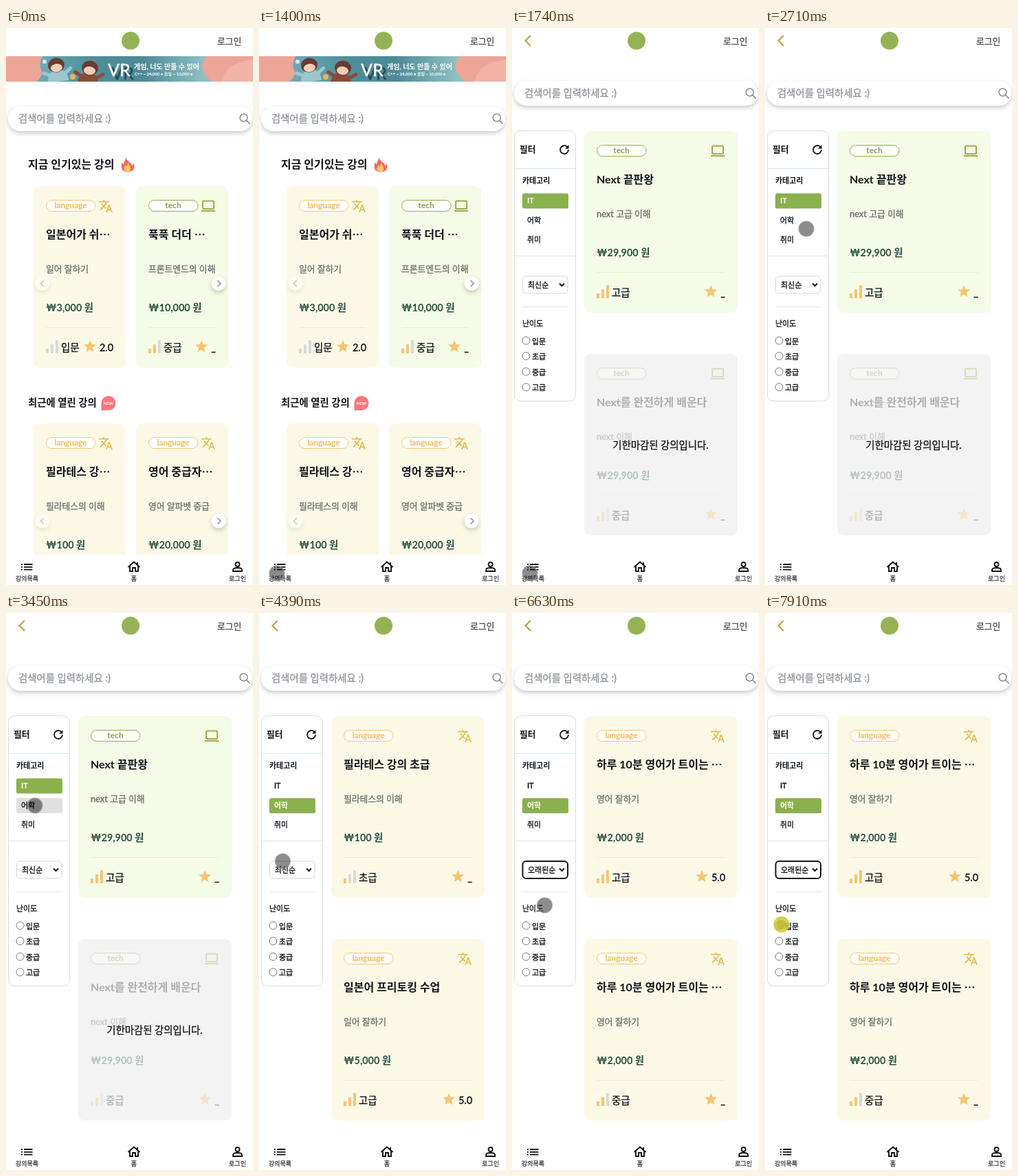
An HTML page that plays this animation: 359 px wide and 810 px high, repeating every 8 s.

```html
<!DOCTYPE html>
<html lang="ko">
<head>
<meta charset="utf-8">
<title>강의 목록</title>
<style>
  html, body { margin: 0; width: 100%; height: 100%; overflow: hidden; background: #fefefe; }
  svg { display: block; width: 100vw; height: 100vh; }
  text { font-family: Lato, "Noto Sans CJK KR", "Noto Sans CJK", sans-serif; font-weight: 500; white-space: pre; stroke-width: .3px; }
  .b { font-weight: 700; stroke: none; }
  .soft { filter: drop-shadow(0 3px 3px rgba(0, 0, 0, .2)); }
  .menu { filter: drop-shadow(0 10px 14px rgba(0, 0, 0, .4)); }
</style>
</head>
<body>
<svg id="stage" viewBox="0 0 359 810"></svg>
<script>
const AMBER = '#f8c471', GOLD = '#e3bd4d', GREEN = '#8bb04e', INK = '#11151c';

// A hairline stroke in the fill colour gives regular text a medium weight.
const text = (x, y, size, str, fill = INK, attrs = '') =>
  `<text x="${x}" y="${y}" font-size="${size}" fill="${fill}" stroke="${fill}" ${attrs}>${str}</text>`;
const rect = (x, y, w, h, r, fill, attrs = '') =>
  `<rect x="${x}" y="${y}" width="${w}" height="${h}" rx="${r}" fill="${fill}" ${attrs}/>`;
const circle = (x, y, r, fill, attrs = '') =>
  `<circle cx="${x}" cy="${y}" r="${r}" fill="${fill}" ${attrs}/>`;
const line = (d, color, width = 1, attrs = '') =>
  `<path d="${d}" fill="none" stroke="${color}" stroke-width="${width}" ${attrs}/>`;
const group = (id, body, attrs = '') => `<g id="${id}" ${attrs}>${body}</g>`;
const BOLD = 'class="b"', MID = 'text-anchor="middle"', END = 'text-anchor="end"';

function star(cx, cy) {
  const points = Array.from({ length: 10 }, (_, i) => {
    const r = i % 2 ? 4.2 : 9.6, a = i * Math.PI / 5;
    return `${(cx + r * Math.sin(a)).toFixed(1)},${(cy - r * Math.cos(a)).toFixed(1)}`;
  });
  return `<polygon points="${points.join(' ')}" fill="${AMBER}"/>`;
}

const translateIcon = (x, y) => `<path transform="translate(${x} ${y}) scale(.91)" fill="${GOLD}" d="M12.87 15.07l-2.54-2.51.03-.03c1.74-1.94 2.98-4.17 3.71-6.53H17V4h-7V2H8v2H1v1.99h11.17C11.5 7.92 10.44 9.75 9 11.35 8.07 10.32 7.3 9.19 6.69 8h-2c.73 1.63 1.73 3.17 2.98 4.56l-5.09 5.02L4 19l5-5 3.11 3.11zM18.5 10h-2L12 22h2l1.12-3h4.75L21 22h2zm-2.62 7l1.62-4.33L19.12 17z"/>`;
const laptopIcon = (x, y) =>
  rect(x + 2, y + 1, 16, 11.5, 1, 'none', 'stroke="#a3a94f" stroke-width="2"') +
  line(`M${x} ${y + 15.5}h20`, '#a3a94f', 2);

const LEVELS = ['입문', '초급', '중급', '고급'];

function card(x, y, w, { tech, title, sub, price, level, rating = '_', closed }) {
  const right = x + w - 18, tint = tech ? GREEN : AMBER;
  const background = closed ? '#f3f3f3' : tech ? '#f4fbe6' : '#fbf9e6';
  const bars = [0, 1, 2].map(i =>
    rect(x + 18 + i * 7, y + 236 - i * 6, 4, 7 + i * 6, .5, i < level ? AMBER : '#d6d9de')).join('');
  const content =
    rect(x + 18.5, y + 20.5, 71.5, 16, 8, '#fff', `stroke="${tint}"`) +
    text(x + 54, y + 32, 12, tech ? 'tech' : 'language', tech ? '#7f9f48' : '#efb95c', MID + (tech ? ' ' + BOLD : '')) +
    (tech ? laptopIcon(right - 21, y + 20.5) : translateIcon(right - 22, y + 18)) +
    text(x + 18, y + 76, 16, title, INK, BOLD) +
    text(x + 18, y + 125, 12.8, sub, '#66706f') +
    text(x + 18, y + 182, 14.4, `₩${price} 원`, '#2b5146', BOLD) +
    line(`M${x + 18} ${y + 205.5}H${right}`, '#ebebdc') +
    bars + text(x + 40, y + 240, 14.4, LEVELS[level]) +
    star(right - (rating === '_' ? 21 : 34), y + 233.5) +
    text(right, y + 240, 14.4, rating, INK, END);
  return rect(x, y, w, 264, 9, background) +
    `<g opacity="${closed ? .3 : 1}">${content}</g>` +
    (closed ? text(x + w / 2 - .5, y + 138, 14.4, '기한마감된 강의입니다.', INK, MID) : '');
}

const searchBar = y =>
  rect(3, y, 355, 36, 18, '#fff', 'class="soft"') +
  text(18, y + 22.5, 14.4, '검색어를 입력하세요 :)', '#8f969d') +
  circle(345.5, y + 16.5, 5.5, 'none', 'stroke="#888d93" stroke-width="1.5"') +
  line(`M349.5 ${y + 20.5}l5 5`, '#888d93', 1.7);

const kid = (x, y, tilt, coat) => `<g transform="translate(${x} ${y}) rotate(${tilt})">
  <path d="M-15 24q0-17 15-17t15 17z" fill="${coat}"/>` +
  line('M-10 14l-10-5M10 14l10-7', coat, 5, 'stroke-linecap="round"') +
  `<ellipse rx="12" ry="10.5" fill="#683c34"/><ellipse cy="4" rx="8.500" ry="6" fill="#f1cdb6"/></g>`;

const banner = `<defs>
  <linearGradient id="sea"><stop offset=".1" stop-color="#74aebb"/><stop offset=".35" stop-color="#508e9b"/><stop offset=".55" stop-color="#4d8996"/><stop offset=".8" stop-color="#8fc0c4"/></linearGradient>
  <clipPath id="strip"><rect y="41" width="359" height="37"/></clipPath></defs>
  <g clip-path="url(#strip)">` +
  rect(0, 41, 359, 37, 0, 'url(#sea)') +
  `<path d="M0 41H53q-6 12-2 20t-7 17H0z" fill="#eda598"/>
   <path d="M359 41H292q-10 12-5 22t14 15h58z" fill="#eda598"/>
   <path d="M359 46q-40 4-46 32h46z" fill="#f2b3a8"/>` +
  kid(73, 54, -8, '#9cc7cd') + kid(122, 58, 8, '#8a4a38') +
  circle(97, 71, 4, '#e8b65c') + circle(56, 49, 3, '#d9e7e8') +
  text(153, 75, 25, 'VR', '#264c59') + text(148, 70, 25, 'VR', '#fff') +
  text(186, 60, 10, '게임, 너도 만들 수 있어', '#fff', BOLD) +
  text(187, 69, 6, 'C++ ~ 24,000 ● 코딩 ~ 10,000 ●', '#e3eff0', 'stroke-width="0"') + '</g>';

const carouselArrows = y =>
  `<g opacity=".45">${circle(53, y, 10.5, '#fff', 'class="soft"')}${line(`M55 ${y - 4.5}l-4.5 4.5 4.5 4.5`, '#aaa', 1.8)}</g>` +
  circle(309, y, 10.5, '#fff', 'class="soft"') + line(`M307.5 ${y - 4.5}l4.5 4.5-4.5 4.5`, '#a3a3a3', 1.8);

const flame = `<path d="M174 187.500c1 6 8 8 10 13l1.500-4c3 8-1 13-9 13s-11-7-7.500-14l2 3c0-5 4-7 3-11z" fill="#f2685e"/>
  <path d="M177 196c4 5 7 13 0 13s-7-5-3-10l1 3c1-1 2-3 2-6z" fill="#f9c868"/>`;
const badge = `<path d="M138.500 556V545.500a10.500 10.500 0 1 1 10.500 10.500z" fill="#f9777c"/>` +
  text(149, 548, 6, 'NEW', '#fff', MID + ' ' + BOLD);

const home = banner + searchBar(114) +
  text(32, 204, 16, '지금 인기있는 강의', INK, BOLD) + flame +
  card(40, 230, 134, { title: '일본어가 쉬⋯', sub: '일어 잘하기', price: '3,000', level: 0, rating: '2.0' }) +
  card(189, 230, 134, { tech: 1, title: '푹푹 더더 ⋯', sub: '프론트엔드의 이해', price: '10,000', level: 2 }) +
  carouselArrows(371.5) +
  text(32, 550, 14.4, '최근에 열린 강의', INK, BOLD) + badge +
  card(40, 575, 134, { title: '필라테스 강⋯', sub: '필라테스의 이해', price: '100', level: 1 }) +
  card(189, 575, 134, { title: '영어 중급자⋯', sub: '영어 알파벳 중급', price: '20,000', level: 2 }) +
  carouselArrows(717);

const cards = (first, second) => card(105, 150, 223, first) + card(105, 474, 223, second);
const daily = { title: '하루 10분 영어가 트이는 ⋯', sub: '영어 잘하기', price: '2,000' };
const lists = {
  tech: cards(
    { tech: 1, title: 'Next 끝판왕', sub: 'next 고급 이해', price: '29,900', level: 3 },
    { tech: 1, title: 'Next를 완전하게 배운다', sub: 'next 이해', price: '29,900', level: 2, closed: 1 }),
  latest: cards(
    { title: '필라테스 강의 초급', sub: '필라테스의 이해', price: '100', level: 1 },
    { title: '일본어 프리토킹 수업', sub: '일어 잘하기', price: '5,000', level: 3, rating: '5.0' }),
  oldest: cards({ ...daily, level: 3, rating: '5.0' }, { ...daily, level: 2 }),
};

const categories = selected => ['IT', '어학', '취미'].map((name, i) => {
  const y = 240.5 + i * 28.7, on = i === selected;
  return (on ? rect(15, y, 67, 22, 2.5, GREEN) : '') + text(22, y + 14.5, 11, name, on ? '#fff' : INK, on ? BOLD : '');
}).join('');

const selectBox = (value, focused) =>
  rect(15.5, 361, 65.5, 25, 5, '#fff', focused ? 'stroke="#15171c" stroke-width="2"' : 'stroke="#d0d5da"') +
  text(23, 377.5, 11, value) + line('M69 371.5l3.5 3.5 3.5-3.5', INK, 2);

const filter =
  rect(3.5, 149.5, 89, 393, 9, '#fff', 'stroke="#d9dde1"') +
  text(11, 181, 12.8, '필터', INK, BOLD) +
  line('M80.5 173a6 6 0 1 0 1.5 4', INK, 1.8) + `<path d="M82.500 170v5.500h-5.500z" fill="${INK}"/>` +
  line('M4 204.5H92', '#d3e5ee') + text(15, 226, 11, '카테고리', INK, BOLD) +
  line('M4 331.5H92M15 405.5H82', '#dfe4e8') +
  text(15, 433.5, 11, '난이도') +
  LEVELS.map((name, i) => circle(20.5, 454.5 + i * 22.6, 5.5, '#fff', 'stroke="#70757b"') +
    text(29, 459.5 + i * 22.6, 11, name)).join('');

const menuItems = active => ['최신순', '오래된순', '인기순', '가격높은순', '가격낮은순'].map((name, i) =>
  (i === active ? rect(15.5, 386.5 + i * 24.8, 71.5, 24, 2, '#abddf5') : '') +
  text(23, 402 + i * 24.9, 12, name, i === active ? '#fff' : INK, i === active ? BOLD : '')).join('');

const nav = rect(0, 766, 359, 44, 0, '#fefefe') +
  line('M26 780H38.5M26 783.8H38.5M26 787.6H38.5M22 780h2M22 783.8h2M22 787.6h2', '#111', 1.8) +
  line('M177.5 784L186 776.5 194.5 784M180 782.5V790h4v-5h4v5h4V782.5M191 777v3', '#111', 1.9) +
  circle(336.5, 780, 3, 'none', 'stroke="#111" stroke-width="1.8"') +
  line('M330 790v-2c0-4 13-4 13 0v2z', '#111', 1.8) +
  [[30.5, '강의목록'], [186, '홈'], [336.5, '로그인']].map(([x, label]) => text(x, 804, 9, label, '#444', MID)).join('');

document.getElementById('stage').innerHTML =
  rect(0, 0, 359, 810, 0, '#fefefe') +
  circle(181, 18.5, 13, '#95b356') + text(307, 24, 12.8, '로그인', '#4a4a4a') +
  group('home', home) +
  group('page', line('M27 11L19.5 18.5 27 26', '#c2a04a', 2.2) + searchBar(77) + filter +
    group('catTech', categories(0)) + group('catLang', categories(1)) +
    rect(15, 269, 67, 22, 2.5, '#000', 'opacity=".12" id="tap"') +
    group('selLatest', selectBox('최신순', false)) + group('selOldest', selectBox('오래된순', true)) +
    Object.entries(lists).map(([id, body]) => group(id, body)).join('')) +
  nav +
  group('menu', rect(15, 386, 72.5, 125, 5, '#fff', 'class="menu" stroke="#8a8f94" stroke-width=".8"') +
    group('menuFirst', menuItems(0)) + group('menuSecond', menuItems(1))) +
  group('touch', circle(0, 0, 10.5, '#000', 'fill-opacity=".45" stroke="#8c8c8c" stroke-opacity=".8" stroke-width="2"')) +
  group('press', circle(0, 0, 11.7, '#cdc92f', 'opacity=".85"') + circle(0, 0, 7, '#8f8c22', 'opacity=".25"')) +
  group('arrow', '<path d="M0 0V16.500l4-3.500 2.700 6.500 2.800-1.200-2.700-6.300H12z" fill="#fff" stroke="#111"/>');

const LOOP = 8000;
// Pointer stops: time, x, y.
const path = [
  [330, 330, 737], [400, 321, 743], [800, 16, 798], [940, 26, 793],
  [2000, 26, 793], [2560, 57, 302], [2710, 60, 292], [2850, 60, 286], [2990, 42, 280],
  [4040, 42, 280], [4390, 34.5, 361], [4520, 34.5, 362], [4860, 35, 373],
  [5000, 35, 373], [5400, 48, 424], [5800, 47.5, 425],
  [6890, 47.5, 425], [7310, 29, 450], [7640, 28.5, 452], [7710, 24, 453],
];
const presses = [[1090, 1160], [3380, 3450], [4930, 5000], [6350, 6550], [7910, 8000]];

function pointerAt(t) {
  const i = path.findIndex(p => p[0] > t);
  if (i < 1) return path[i < 0 ? path.length - 1 : 0].slice(1);
  const [t0, x0, y0] = path[i - 1], [t1, x1, y1] = path[i];
  const u = (t - t0) / (t1 - t0), k = u * u * (3 - 2 * u);
  return [x0 + (x1 - x0) * k, y0 + (y1 - y0) * k];
}

const $ = id => document.getElementById(id);
const show = (id, on) => { $(id).style.display = on ? '' : 'none'; };

function render(t) {
  const within = (a, b) => t >= a && t < b;
  show('home', t < 1470);
  show('page', t >= 1470);
  show('tech', t < 3710);
  show('catTech', t < 3710);
  show('catLang', t >= 3710);
  show('tap', within(3380, 3710));
  show('latest', within(3710, 6550));
  show('oldest', t >= 6550);
  show('selLatest', t < 5800);
  show('selOldest', t >= 5800);
  show('menu', within(5000, 5800));
  show('menuFirst', t < 5730);
  show('menuSecond', t >= 5730);

  const pressed = presses.some(([a, b]) => within(a, b)), arrow = within(5000, 5800);
  show('touch', t >= 400 && !pressed && !arrow);
  show('press', pressed);
  show('arrow', arrow);
  const [x, y] = pointerAt(t);
  for (const id of ['touch', 'press', 'arrow']) $(id).setAttribute('transform', `translate(${x} ${y})`);
}

const start = performance.now();
(function frame() {
  render((performance.now() - start) % LOOP);
  requestAnimationFrame(frame);
})();
</script>
</body>
</html>
```
